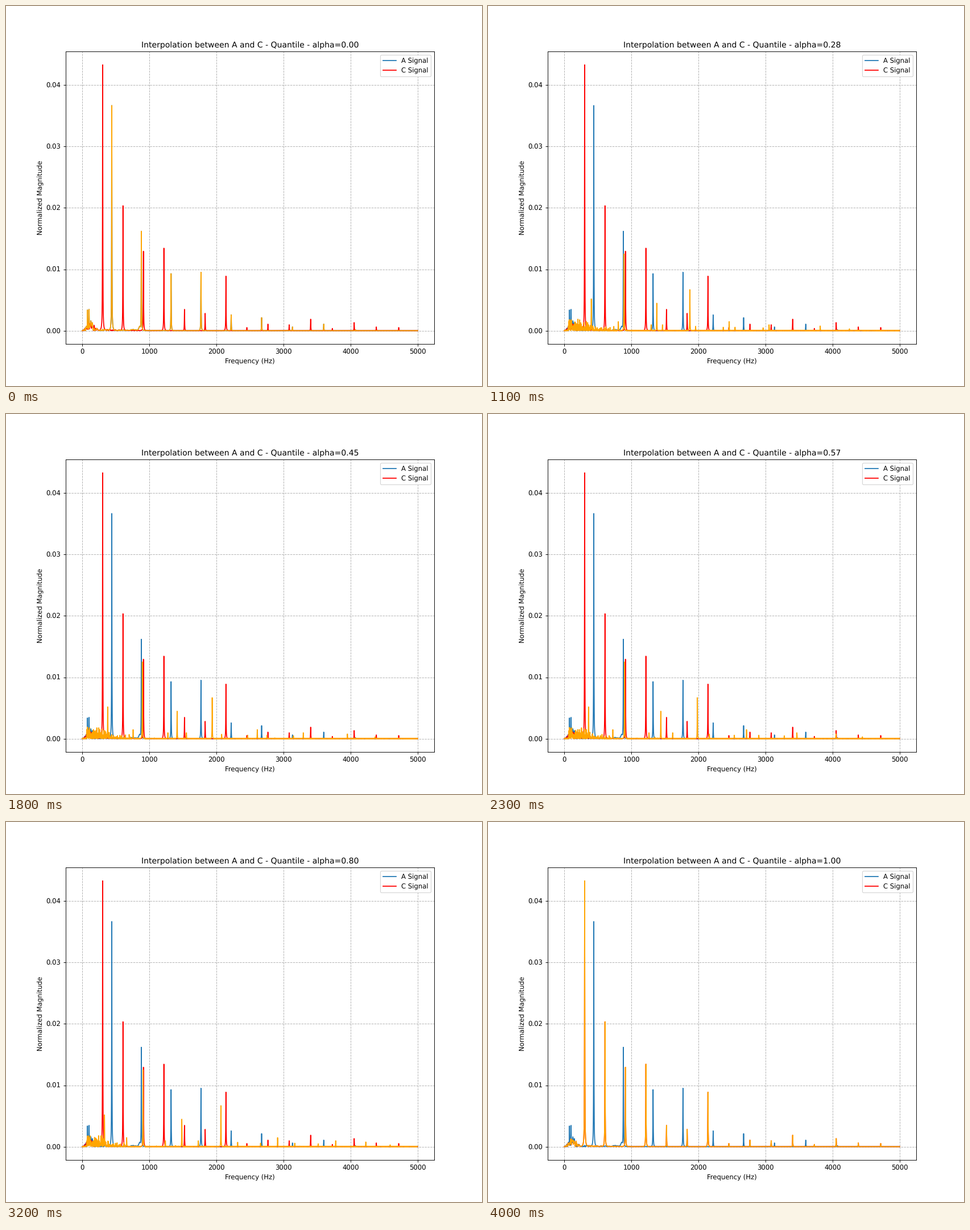
Write a matplotlib script that moves like this. It is 837x669 px and loops after 4.1 s.

```python
import numpy as np
import matplotlib.pyplot as plt
from matplotlib.animation import FuncAnimation

W, H, DPI = 837, 669, 83.7
STEPS = 41
plt.rcParams["text.hinting"] = "no_hinting"  # keeps text widths linear

freq = np.arange(5001.0)
rng = np.random.default_rng(7)


def harmonic(n, base, stiffness):
    """Frequency of the n-th partial of a slightly stiff string."""
    n = np.asarray(n)
    return n * base * np.sqrt(1 + stiffness * n ** 2)


def add_peak(spectrum, center, height, width=2.5):
    """Raise the spectrum to a narrow resonance at the nearest bin."""
    d = (freq - round(center)) / width
    np.maximum(spectrum, height / (1 + d * d), out=spectrum)


def bump(center, width):
    return np.exp(-((freq - center) / width) ** 2)


def rough_floor(level):
    """Jagged low-frequency noise that fades into a thin floor."""
    knots = np.arange(0, 5009, 8)
    jagged = np.interp(freq, knots, rng.random(knots.size) ** 1.5)
    fade = level * bump(120, 60) + .0006 * np.exp(-freq / 400)
    return .00004 + jagged * fade * np.minimum(freq / 60, 1)


HEIGHT_A = np.array([36.65, 16.2, 9.3, 9.53, 2.6, 2.15, .65, 1.1, .2]) / 1000
HEIGHT_C = np.array([43.26, 20.35, 12.95, 13.45, 3.5, 2.85, 8.9, .55,
                     1.1, 1, 1.9, .4, 1.35, .65, .55]) / 1000
FREQ_A = harmonic(np.arange(1, 10), 440, .00072)
FREQ_C = harmonic(np.arange(1, 16), 303.5, .00033)

spec_a = rough_floor(.0012) + .0007 * bump(860, 22) + .00015 * bump(760, 50)
spec_c = rough_floor(.0013)
for args in [(78, .0034), (101, .0035), *zip(FREQ_A, HEIGHT_A)]:
    add_peak(spec_a, *args)
for args in zip(FREQ_C, HEIGHT_C):
    add_peak(spec_c, *args)

# Partials of A, the partials of C they turn into, and height on the way
FROM = np.array([1, 2, 3, 4, 5, 6, 8]) - 1
TO = np.array([1, 3, 5, 7, 10, 13, 14]) - 1
MID = np.array([5.2, 12.5, 4.5, 6.7, 1.5, 1, .8]) / 1000
# Weaker partials that split off on the way
BRANCHES = [(2, 2), (3, 4), (3, 6), (4, 8), (5, 9), (5, 11), (6, 12), (9, 15)]
LOW = [(78, 92), (101, 120), (205, 295)]

# Small grains of energy follow one monotone map through the partials
map_x = np.sort([0, 100, 205, 850, 5000, *FREQ_A[FROM]])
map_y = np.sort([0, 115, 295, 610, 5000, *FREQ_C[TO]])
grain_x = np.minimum(60 + rng.exponential(380, 420), 4800)
grain_h = rng.exponential(.00055 * np.exp(-grain_x / 420) + .00006)
grain_h = np.minimum(grain_h, .0016)
grain_end = np.interp(grain_x, map_x, map_y)


def blend(step):
    a = step / (STEPS - 1)
    if a == 0:
        return spec_a
    if a == 1:
        return spec_c

    def move(start, end):
        return (1 - a) * start + a * end

    noise = np.random.default_rng(100 + step)
    hiss = .00005 + .0006 * bump(130, 60) + .0002 * bump(350, 180)
    out = .00003 + hiss * noise.random(freq.size)
    where = np.rint(move(grain_x, grain_end)).astype(int)
    np.maximum.at(out, where, grain_h * noise.uniform(.75, 1.2, where.size))

    # Energy spreads quickly after the start and gathers again at the end
    leave, arrive = np.exp(-a / .02), np.exp(-(1 - a) / .02)
    heights = (MID + (HEIGHT_A[FROM] - MID) * leave
               + (HEIGHT_C[TO] - MID) * arrive)
    for center, height in zip(move(FREQ_A[FROM], FREQ_C[TO]), heights):
        add_peak(out, center, height, 2)
    for n, m in BRANCHES:
        add_peak(out, move(FREQ_A[n - 1], FREQ_C[m - 1]), .003 / n)
    for start, end in LOW:
        add_peak(out, move(start, end), .0018)
    return out


fig, ax = plt.subplots(figsize=((W + .01) / DPI, (H + .01) / DPI), dpi=DPI)
ax.plot(freq, spec_a, label="A Signal")
ax.plot(freq, spec_c, color="red", label="C Signal")
mix, = ax.plot(freq, spec_a, color="orange")
ax.set_xlim(-250, 5250)
ax.set_ylim(-.05 * HEIGHT_C[0], 1.05 * HEIGHT_C[0])
ax.set_xlabel("Frequency (Hz)")
ax.set_ylabel("Normalized Magnitude")
ax.grid(True, linestyle="--")
ax.legend(loc="upper right", labelspacing=.47)
title = ax.set_title("")


def update(step):
    mix.set_ydata(blend(step))
    alpha = step / (STEPS - 1)
    title.set_text(f"Interpolation between A and C - Quantile - alpha={alpha:.2f}")
    return mix, title


anim = FuncAnimation(fig, update, frames=STEPS, interval=100, repeat=True,
                     repeat_delay=0, blit=False)
plt.show()
```
